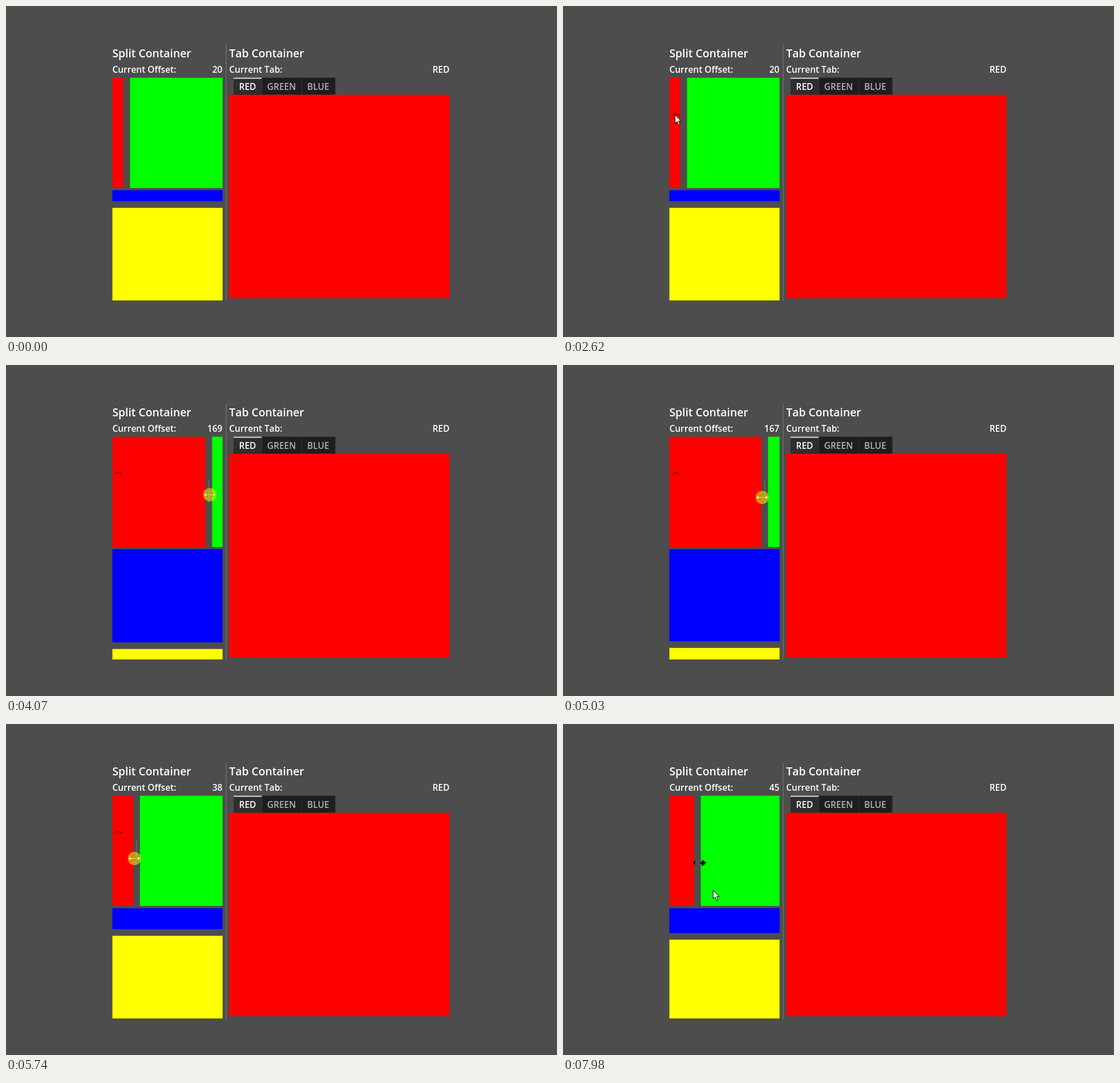
Write an HTML page that moves like this. It is 966 px wide and 580 px high and loops after 8 s.

```html
<!DOCTYPE html>
<html lang="en">
<head>
<meta charset="utf-8">
<title>Split and tab containers</title>
<style>
  html, body { margin: 0; height: 100%; overflow: hidden; background: #4d4d4d; }
  svg { display: block; }
  text { font: 600 15.46px "Open Sans", "Noto Sans", sans-serif; font-kerning: none; fill: #fff; }
  .title { font-size: 19.32px; }
  .end { text-anchor: end; }
  .dim { fill: #b3b3b3; }
</style>
</head>
<body>
<svg width="966" height="580" viewBox="0 0 966 580">
  <path d="M386 68V517" stroke="#7d7d7d"/>
  <text class="title" x="186.4" y="90">Split Container</text>
  <text x="186.5" y="117">Current Offset:</text>
  <text id="value" class="end" x="379.3" y="117"></text>
  <rect id="red" x="186.5" y="125.7" height="193.2" fill="#f00"/>
  <rect id="green" y="125.7" height="193.2" fill="#0f0"/>
  <rect id="blue" x="186.5" y="322.8" width="193.2" fill="#00f"/>
  <rect id="yellow" x="186.5" width="193.2" fill="#ff0"/>

  <text class="title" x="391.3" y="90">Tab Container</text>
  <text x="391.3" y="117">Current Tab:</text>
  <text class="end" x="777.5" y="117">RED</text>
  <rect x="399" y="126" width="49.5" height="30" fill="#2e2e2e"/>
  <rect x="399" y="125.6" width="49.5" height="2" fill="#d9d9d9"/>
  <rect x="448.5" y="125.6" width="129" height="30" fill="#1e1e1e"/>
  <path d="M449 126v30M518.5 126v30M577 126v30" stroke="#303030"/>
  <text x="408.5" y="147">RED</text>
  <text class="dim" x="457.8" y="147">GREEN</text>
  <text class="dim" x="528" y="147">BLUE</text>
  <rect x="391.3" y="155.6" width="386.4" height="356.5" fill="#f00"/>

  <path id="smudge" d="M193 192q1-5 4-4 3 0 3 2M199 190.5h6" fill="none" stroke="#700" stroke-width="1.6"/>
  <path id="grabber" d="M0 203v38.6" stroke="#777"/>
  <path id="trail" d="M227.5 243l4-4v8zM241 242h2v-3h3l5 4-5 5h-3v-3h-2z"/>
  <path id="resize" d="M-10.5 0L-6-4.5V-1H6V-4.5L10.5 0 6 4.5V1H-6V4.5z" fill="#fff" stroke="#000" stroke-width=".8"/>
  <circle id="press" r="11.6" fill="#ff0" fill-opacity=".5"/>
  <path id="pointer" d="M-.3-.3V14.6L3.4 11.5 6 17.6 8.4 16.6 5.9 10.7H10.3z" fill="#fff" stroke="#000"/>
</svg>
<script>
const $ = id => document.getElementById(id);
const LOOP = 8000, STEP = 70;
const SCALE = 0.966, LEFT = 186.5, TOP = 322.8, SIZE = 193.2, GAP = 12 * SCALE;
const GRIP = 4.8, LAG = 18, MAX_OFFSET = 188;

// Each stroke takes the cursor from where it rests to (x, y); a and b shape its start and its end.
const origin = { x: 668, y: 606 };
const enter = { from: 1310, to: 2160, x: 195, y: 189, a: 1, b: 1.2 };
const approach = { from: 2550, to: 3180, x: 210.5, y: 207, a: 1, b: 1 };
const dragRight = { from: 3300, to: 4560, x: 384, y: 231, a: 2, b: 4 };
const dragLeft = { from: 4820, to: 6160, x: 181, y: 237, a: 1.15, b: 1.49 };
const dragBack = { from: 6350, to: 6970, x: 235.2, y: 237.5, a: 1, b: 1.6 };
const leave = { from: 7630, to: 7980, x: 263.5, y: 291.7, a: 2, b: 1 };
const strokes = [enter, approach, dragRight, dragLeft, dragBack, leave];

const clamp = (v, low, high) => Math.min(high, Math.max(low, v));

function snap(t) {
  const stroke = strokes.findLast(s => t >= s.from);
  if (!stroke) return 0;
  return Math.min(stroke.to, t - (t - stroke.from) % STEP);
}

function cursorAt(t) {
  let { x, y } = origin;
  for (const s of strokes) {
    const u = clamp((t - s.from) / (s.to - s.from), 0, 1);
    const progress = 1 - (1 - u ** s.a) ** s.b;
    x += (s.x - x) * progress;
    y += (s.y - y) * progress;
  }
  return { x, y };
}

// The split follows the grabbed cursor slightly late.
function offsetAt(t) {
  const { x } = cursorAt(clamp(t, dragRight.from, dragBack.to) - LAG);
  return clamp(Math.round((x - LEFT) / SCALE - GRIP), 0, MAX_OFFSET);
}

function set(id, attrs) {
  for (const name in attrs) $(id).setAttribute(name, attrs[name]);
}

function show(id, on) {
  $(id).style.display = on ? "" : "none";
}

function draw() {
  const t = performance.now() % LOOP, time = snap(t);
  const { x, y } = cursorAt(time);
  const offset = offsetAt(time);
  const first = offset * SCALE, second = first + GAP, rest = Math.max(0, SIZE - second);

  $("value").textContent = offset;
  set("red", { width: first });
  set("green", { x: LEFT + second, width: rest });
  set("blue", { height: first });
  set("yellow", { y: TOP + second, height: rest });
  set("grabber", { transform: `translate(${LEFT + first + GAP / 2})` });
  for (const id of ["pointer", "resize", "press"]) set(id, { transform: `translate(${x} ${y})` });

  const resizing = t >= 2970 && t < 7840;
  show("pointer", t >= enter.from + STEP && !resizing);
  show("resize", resizing);
  show("grabber", resizing);
  show("press", t >= dragRight.from + STEP && t < 7300);
  show("smudge", t >= enter.to && t < 6020);
  show("trail", t >= 7840);
  requestAnimationFrame(draw);
}

draw();
</script>
</body>
</html>
```
